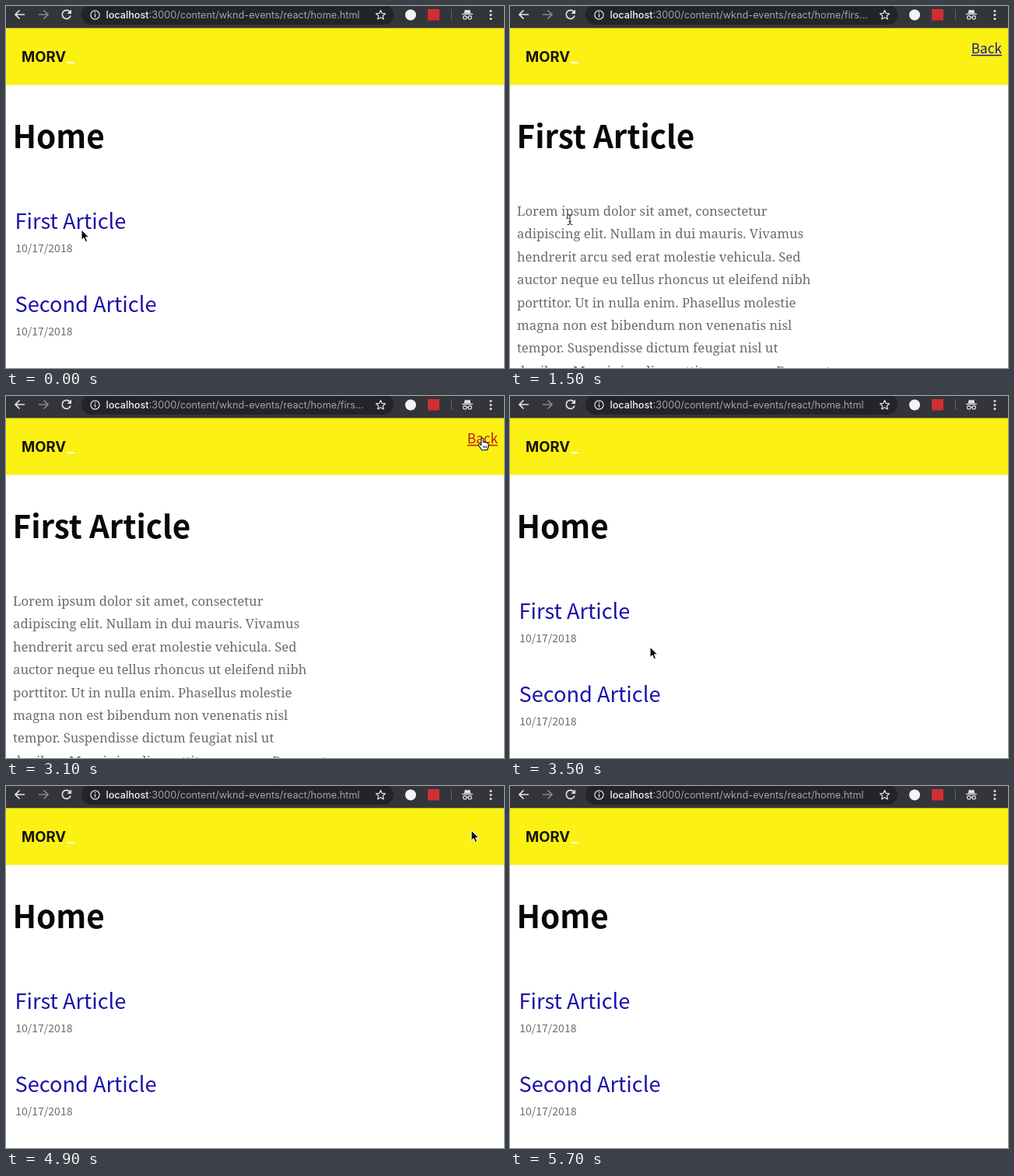
Recreate the animation shown at these times as an HTML page. Size 640 by 466 pixels, loop 5.8 s.

```html
<!DOCTYPE html>
<html lang="en">
<head>
<meta charset="utf-8">
<title>Article browsing</title>
<style>
  html, body { margin: 0; width: 100%; height: 100%; overflow: hidden; background: #fff; }
  svg { display: block; width: 640px; height: 466px; }
  text { white-space: pre; font-family: "Noto Sans CJK JP", "Noto Sans CJK SC", "Noto Sans CJK", "Source Sans Pro", sans-serif; }
  .url { font: 12.7px Inter, Roboto, sans-serif; fill: #a2a4a8; }
  .host { font-weight: 500; fill: #f4f4f5; }
  .brand { font: 700 18.5px Inter, sans-serif; fill: #14140f; }
  .title { font-size: 40.4px; font-weight: 700; fill: #080808; }
  .link { font-size: 27.2px; fill: #1c12a8; }
  .date { font-size: 14px; fill: #6c6c6c; }
  .body { font: 500 16.7px "Noto Serif", serif; fill: #6c6c6c; }
  .side { font-size: 20.3px; font-weight: 700; fill: #080808; }
  .back { font-size: 17.2px; }
  .icon { fill: none; stroke: #e4e5e7; stroke-width: 1.7; }
</style>
</head>
<body>
<svg viewBox="0 0 640 466" xmlns="http://www.w3.org/2000/svg">
  <rect width="640" height="466" fill="#fff"/>
  <rect y="28" width="640" height="73.600" fill="#fbf113"/>
  <rect width="640" height="28.400" fill="#34353a"/>
  <rect x="97" y="-2" width="401" height="26" rx="13" fill="#232428"/>

  <g class="icon">
    <path d="M24 11H12M17.500 5.500L12 11l5.500 5.500"/>
    <path d="M42 11h12M48.500 5.500L54 11l-5.500 5.500" stroke="#85878b"/>
    <path d="M81.800 7.200A5.500 5.500 0 1 0 83 12.500"/>
    <circle cx="114.500" cy="11.500" r="5.600" stroke-width="1.200"/>
    <path d="M114.500 10.500v4M114.500 7.800v1.500" stroke-width="1.400"/>
    <path id="star" stroke-width="1.200" stroke-linejoin="round"/>
    <path d="M572.500 4v14" stroke="#606166" stroke-width="1"/>
    <path d="M586 10.500h14" stroke-width="1.300"/>
    <circle cx="589.800" cy="14.800" r="2.200" stroke-width="1.200"/>
    <circle cx="596.200" cy="14.800" r="2.200" stroke-width="1.200"/>
    <path d="M592 14.500h2" stroke-width="1"/>
  </g>
  <g fill="#e4e5e7">
    <path d="M84 4.500V10H78.500Z"/>
    <path d="M588.500 9.500l1.400-4.700 3.100.8 3.100-.8 1.400 4.700z"/>
    <circle cx="623" cy="6.500" r="1.500"/><circle cx="623" cy="11.500" r="1.500"/><circle cx="623" cy="16.500" r="1.500"/>
  </g>
  <circle cx="520" cy="11.500" r="7" fill="#f4f4f4"/>
  <rect x="542" y="4" width="15" height="14.500" fill="#cf2f31"/>
  <text class="url" x="128.500" y="16"><tspan class="host">localhost</tspan><tspan id="path"></tspan></text>
  <text class="brand" x="20" y="72">MORV</text>
  <rect x="78.500" y="72" width="9.500" height="2" fill="#fffde0"/>

  <text id="title" class="title" x="8.500" y="183"></text>
  <g id="home"></g>
  <g id="article"></g>
  <g id="sidebar"></g>
  <g id="back">
    <text class="back" x="592.700" y="61" fill="currentColor">Back</text>
    <path d="M593 63.500h39" stroke="currentColor" stroke-width="1.600"/>
  </g>

  <g id="arrow">
    <path d="M0 0V13.300L3 10.500L5.100 15.500L7.500 14.500L5.400 9.700H9.500Z" fill="#080808" stroke="#fff" stroke-width="1"/>
  </g>
  <g id="beam" fill="none">
    <path d="M-3.500-6.500Q0-6.500 0-4Q0-6.500 3.500-6.500M0-4.500V4.500M-3.500 6.500Q0 6.500 0 4Q0 6.500 3.500 6.500M-1.800 2.500H1.800" stroke="#333" stroke-width="1.200"/>
  </g>
  <g id="hand" stroke="#111">
    <path d="M-1.300 1Q0-.8 1.300 1V5.500Q2.600 4.500 3.700 5.800Q5 5 6 6.500Q7.800 6 8 8V11L6.500 15.500H-.5L-4.700 9.500Q-4.800 7.500-3 7.800L-1.300 9.300Z" fill="#fff" stroke-width="1.100" stroke-linejoin="round"/>
    <path d="M1.600 10v3M3.500 10v3M5.400 10v3" stroke-width=".8"/>
  </g>
</svg>
<script>
const LOOP = 5800, STEP = 100;
const $ = id => document.getElementById(id);

const make = (parent, tag, attrs, content = "") => {
  const el = document.createElementNS("http://www.w3.org/2000/svg", tag);
  for (const key in attrs) el.setAttribute(key, attrs[key]);
  el.textContent = content;
  parent.append(el);
  return el;
};
const show = (el, on) => { el.style.display = on ? "" : "none"; };

const starPoints = Array.from({ length: 10 }, (_, i) => {
  const r = i % 2 ? 2.9 : 6.4, a = i * Math.PI / 5;
  return `${481.5 + r * Math.sin(a)} ${11.8 - r * Math.cos(a)}`;
});
$("star").setAttribute("d", `M${starPoints.join("L")}Z`);

const cards = ["First Article", "Second Article"].map((name, i) => {
  const y = 250 + i * 107;
  const card = make($("home"), "rect", { x: 9, y, width: 415, height: 77, fill: "#e8e8e8" });
  make($("home"), "text", { class: "link", x: 11.5, y: y + 37 }, name);
  make($("home"), "text", { class: "date", x: 12.3, y: y + 67 }, "10/17/2018");
  return card;
});

const paragraph = (parent, x, y, lines) => lines.forEach((line, i) =>
  make(parent, "text", { class: "body", x, y: y + i * 29.4 }, line));

paragraph($("article"), 9, 270, [
  "Lorem ipsum dolor sit amet, consectetur",
  "adipiscing elit. Nullam in dui mauris. Vivamus",
  "hendrerit arcu sed erat molestie vehicula. Sed",
  "auctor neque eu tellus rhoncus ut eleifend nibh",
  "porttitor. Ut in nulla enim. Phasellus molestie",
  "magna non est bibendum non venenatis nisl",
  "tempor. Suspendisse dictum feugiat nisl ut",
  "dapibus. Mauris iaculis porttitor posuere. Praesent"
]);
make($("sidebar"), "text", { class: "side", x: 438.3, y: 285 }, "Sidebar heading");
paragraph($("sidebar"), 439, 364, ["Morbi euismod magna", "ac lorem rutrum", "elementum."]);

const pages = {
  home: { title: "Home", path: ".html" },
  first: { title: "First Article", path: "/firs..." },
  second: { title: "Second Article", path: "/sec..." }
};

// Each table holds a start time and the state that lasts until the next row.
const pageSteps = [[0, "home"], [1300, "first"], [3200, "home"], [3800, "second"], [4900, "home"]];
const hoverSteps = [[0, -1], [700, 0], [1300, -1], [3600, 1], [3800, -1]];
const cursorSteps = [
  [0, "arrow"], [900, "hand"], [1300, "beam"], [2600, "arrow"], [2900, "hand"],
  [3200, "arrow"], [3600, "hand"], [3800, "beam"], [4500, "arrow"], [4700, "hand"],
  [4900, "arrow"], [5300, ""]
];
// Time and cursor tip.
const route = [
  [0, 97, 288], [600, 97, 288], [700, 75, 258], [1000, 77, 275], [2300, 77, 275],
  [2900, 612, 54], [3200, 612, 54], [3600, 100, 373], [4300, 100, 373],
  [4800, 598, 57], [5800, 598, 57]
];

const at = (steps, t) => steps.filter(s => s[0] <= t).pop()[1];
const ease = p => p * p * (3 - 2 * p);

function position(t) {
  const i = route.findIndex(r => r[0] > t);
  const [t0, x0, y0] = route[i - 1], [t1, x1, y1] = route[i];
  const p = ease((t - t0) / (t1 - t0));
  return [x0 + (x1 - x0) * p, y0 + (y1 - y0) * p];
}

function draw(now) {
  const t = Math.floor((now % LOOP) / STEP) * STEP;
  const page = at(pageSteps, t), hover = at(hoverSteps, t), cursor = at(cursorSteps, t);
  const isHome = page === "home";

  $("title").textContent = pages[page].title;
  $("path").textContent = ":3000/content/wknd-events/react/home" + pages[page].path;
  show($("home"), isHome);
  show($("article"), !isHome);
  show($("back"), !isHome);
  show($("sidebar"), page === "second");
  cards.forEach((card, i) => show(card, i === hover));
  $("back").style.color = cursor === "hand" ? "#c3141c" : "#1b149c";

  const [x, y] = position(t);
  for (const kind of ["arrow", "beam", "hand"]) {
    show($(kind), kind === cursor);
    $(kind).setAttribute("transform", `translate(${x} ${y})`);
  }
}

const start = performance.now();
function tick() {
  draw(performance.now() - start);
  requestAnimationFrame(tick);
}
tick();
</script>
</body>
</html>
```
